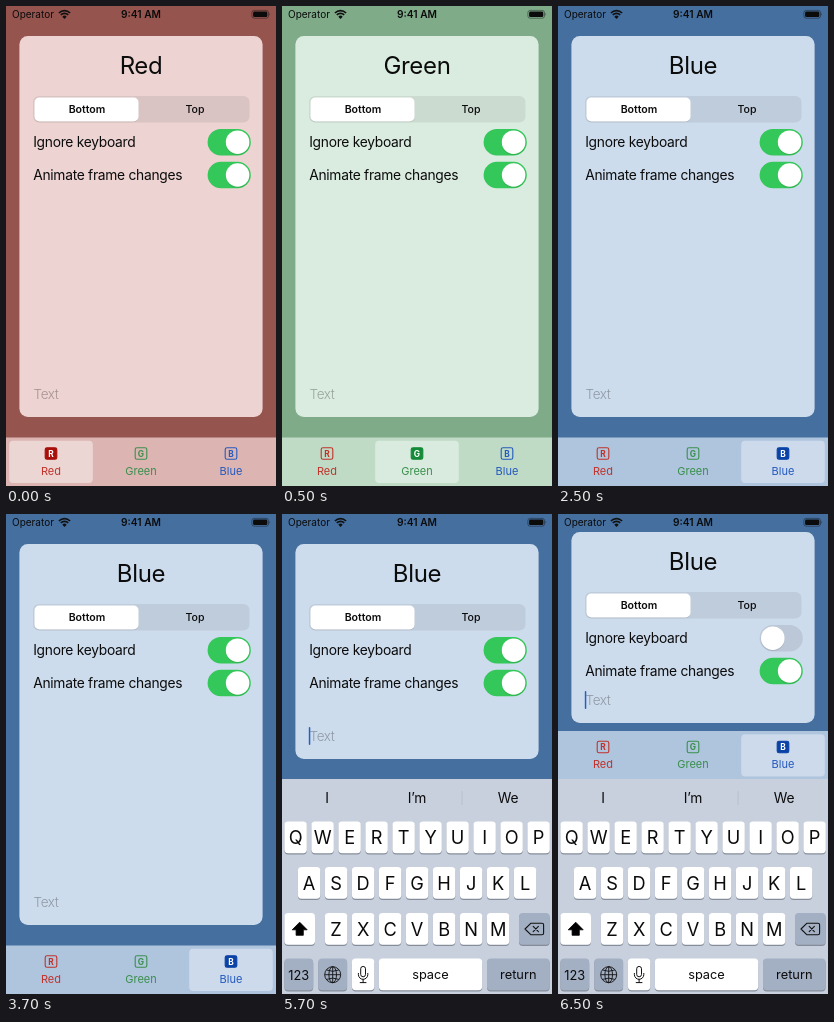
Recreate the animation shown at these times as an HTML page. Size 270 by 480 pixels, loop 8 s.

```html
<!DOCTYPE html>
<html lang="en">
<head>
<meta charset="utf-8">
<title>Tab colours</title>
<style>
  html, body { margin: 0; width: 100%; height: 100%; overflow: hidden; }
  svg { display: block; width: 100%; height: 100%; }
  text { font-family: Inter, Roboto, sans-serif; fill: #0b0b0c; }
  .mid { text-anchor: middle; }
  .title { font-size: 24px; letter-spacing: -.35px; }
  .row { font-size: 13.8px; letter-spacing: -.28px; }
  .seg { font-size: 10.6px; font-weight: 500; }
  .bold { font-weight: 600; }
  .hint { font-size: 13.5px; font-weight: 300; letter-spacing: -.4px; fill: #000; opacity: .3; }
  .tab { font-size: 11px; }
  .badge { font-size: 8.4px; font-weight: 700; }
  .key { font-size: 18.2px; }
  .word { font-size: 12.8px; }
</style>
</head>
<body>
<svg id="stage" viewBox="0 0 270 480" preserveAspectRatio="none"></svg>
<script>
const themes = {
  Red:   { back: '#96544f', card: '#edd3d2', track: '#dac4c3', bar: '#dcb5b3', lit: '#ecd6d4' },
  Green: { back: '#7fab89', card: '#daece0', track: '#cbdbd0', bar: '#bfdbc6', lit: '#d9ebdf' },
  Blue:  { back: '#456f9f', card: '#cddcec', track: '#bfccdb', bar: '#afc4dd', lit: '#ccdaec' }
};
const tabs = [
  { name: 'Red',   x: 45,  ink: '#c0322a', full: '#a80f0a' },
  { name: 'Green', x: 135, ink: '#3a8f4c', full: '#158a38' },
  { name: 'Blue',  x: 225, ink: '#2459bd', full: '#0a42a6' }
];
const scenes = [
  { at: 0,    theme: 'Red',   top: 30, bottom: 411, tabY: 431.5, ignore: true },
  { at: 500,  theme: 'Green', top: 30, bottom: 411, tabY: 431.5, ignore: true },
  { at: 2500, theme: 'Blue',  top: 30, bottom: 411, tabY: 431.5, ignore: true },
  { at: 4500, theme: 'Blue',  top: 30, bottom: 245, tabY: null,  ignore: true,  typing: true },
  { at: 6500, theme: 'Blue',  top: 18, bottom: 209, tabY: 217,   ignore: false, typing: true }
];
const LOOP = 8000;

const rect = (x, y, w, h, r, fill, more = '') =>
  `<rect x="${x}" y="${y}" width="${w}" height="${h}" rx="${r}" fill="${fill}" ${more}/>`;
const text = (x, y, cls, s, more = '') => `<text x="${x}" y="${y}" class="${cls}" ${more}>${s}</text>`;
const path = (d, more) => `<path d="${d}" ${more}/>`;
const line = (d, w, color = '#111') =>
  path(d, `fill="none" stroke="${color}" stroke-width="${w}" stroke-linecap="round" stroke-linejoin="round"`);
const move = (y, s) => `<g transform="translate(0 ${y})">${s}</g>`;

function statusBar() {
  const arc = r => {
    const d = r * .707;
    return path(`M${58.5 - d} ${12.6 - d}A${r} ${r} 0 0 1 ${58.5 + d} ${12.6 - d}`,
      'fill="none" stroke="#111" stroke-width="1.7"');
  };
  return text(6, 12.2, '', 'Operator', 'font-size="10"') +
    arc(7.9) + arc(5.2) + path('M58.5 13L56.3 10.7A3.1 3.1 0 0 1 60.7 10.7Z', 'fill="#111"') +
    text(135, 12.2, 'mid bold', '9:41 AM', 'font-size="10.2"') +
    rect(245.9, 4.4, 16.6, 7.8, 2.2, 'none', 'stroke="#111" stroke-opacity=".55" stroke-width=".8"') +
    rect(247.1, 5.6, 14.2, 5.4, 1.3, '#0b0b0c') +
    path('M263.5 6.8Q264.9 8.3 263.5 9.8Z', 'fill="#111" opacity=".6"');
}

function toggle(y, on, off) {
  return rect(201.6, y - 13.2, 43.2, 26.4, 13.2, on ? '#34c759' : off) +
    `<circle cx="${on ? 231.6 : 214.8}" cy="${y + .8}" r="12" fill="#000" opacity=".1"/>` +
    `<circle cx="${on ? 231.6 : 214.8}" cy="${y}" r="11.8" fill="#fff"/>`;
}

function card(s, t) {
  const mid = s.bottom - 23;
  const head = text(135, 68, 'mid title', s.theme) +
    rect(27, 90, 216.5, 26.5, 6.2, t.track) +
    rect(28.4, 92.2, 104.2, 24, 5, '#000', 'opacity=".12"') +
    rect(28.4, 91.6, 104.2, 23.8, 5, '#fff') +
    text(81, 107.2, 'mid seg bold', 'Bottom') +
    text(189, 107.2, 'mid seg', 'Top') +
    text(27.2, 141, 'row', 'Ignore keyboard') + toggle(136.2, s.ignore, '#bcc8d7') +
    text(27.2, 174, 'row', 'Animate frame changes') + toggle(169, true);
  return rect(13.4, s.top, 243.2, s.bottom - s.top, 8.5, t.card) +
    move(s.top - 30, head) +
    text(27.6, mid + 5, 'hint', 'Text') +
    (s.typing ? rect(26.8, mid - 9, 1.5, 18, .7, '#2360c4') : '');
}

function tabBar(s, t) {
  const items = tabs.map(b => {
    const on = b.name === s.theme, color = on ? b.full : b.ink;
    return (on ? rect(b.x - 41.8, 3.2, 83.6, 42.3, 4, t.lit) : '') +
      rect(b.x - 5.8, 10.2, 11.6, 11.6, 1.8, on ? color : 'none', `stroke="${color}" stroke-width="1.1"`) +
      text(b.x, 19.1, 'mid badge', b.name[0], `style="fill:${on ? '#fff' : color}"`) +
      text(b.x, 37.4, 'mid tab', b.name, `style="fill:${b.ink}"`);
  });
  return move(s.tabY, rect(0, 0, 270, 48.5, 0, t.bar) + items.join(''));
}

function keyboard() {
  const key = (x, y, w, fill = '#fff') =>
    rect(x, y + 1, w, 32, 3.7, '#858d9a') + rect(x, y, w, 31.8, 3.7, fill);
  const gray = '#a3afc3';
  const rows = [['QWERTYUIOP', 2.4, 307.5], ['ASDFGHJKL', 15.9, 353], ['ZXCVBNM', 42.9, 399]];
  let out = rect(0, 265, 270, 215, 0, '#c8d0de');
  [['I', 45], ['I’m', 135], ['We', 226]].forEach(([s, x]) => { out += text(x, 289, 'mid row', s); });
  out += rect(179.7, 277, .7, 14, 0, '#b2bac9');
  for (const [letters, x, y] of rows)
    [...letters].forEach((c, i) => {
      const kx = x + i * 27;
      out += key(kx, y, 22.4) + text(kx + 11.2, y + 22.6, 'mid key', c);
    });

  out += key(2.4, 399, 30.6) +
    path('M17.7 408.2L25.2 415.8H21.3V421.3H14.1V415.8H10.2Z',
      'fill="#000" stroke="#000" stroke-width=".8" stroke-linejoin="round"');
  out += key(237, 399, 30.6, gray) +
    line('M249 409.2H260Q261.6 409.2 261.6 410.8V419.2Q261.6 420.8 260 420.8H249L243 415Z', 1.1) +
    line('M251.2 412.4L256.4 417.6M256.4 412.4L251.2 417.6', 1.1);

  out += key(2.4, 444.5, 28.8, gray) + text(16.8, 465.5, 'mid word', '123');
  out += key(36.3, 444.5, 28.8, gray) +
    '<g fill="none" stroke="#111" stroke-width=".9"><circle cx="50.7" cy="460.7" r="8"/>' +
    '<ellipse cx="50.7" cy="460.7" rx="3.8" ry="8"/>' +
    '<path d="M50.7 452.7V468.7M42.7 460.7H58.7M44.6 456Q50.7 458.6 56.8 456M44.6 465.4Q50.7 462.8 56.8 465.4"/></g>';
  out += key(69.9, 444.5, 22.4) +
    rect(78.7, 452.4, 4.8, 10.4, 2.4, 'none', 'stroke="#111" stroke-width="1"') +
    line('M76.4 459.4V460.6A4.7 4.7 0 0 0 85.8 460.6V459.4M81.1 465.4V468.6M78.2 468.6H84', 1);
  out += key(96.9, 444.5, 103.3) + text(148.5, 464.6, 'mid word', 'space');
  out += key(205, 444.5, 62.6, gray) + text(236.3, 464.6, 'mid word', 'return');
  return out;
}

const draw = s => {
  const t = themes[s.theme];
  return '<g visibility="hidden">' + rect(0, 0, 270, 480, 0, t.back) + statusBar() + card(s, t) +
    (s.tabY === null ? '' : tabBar(s, t)) + (s.typing ? keyboard() : '') + '</g>';
};

const stage = document.getElementById('stage');
stage.innerHTML = scenes.map(draw).join('');
const layers = [...stage.children];

function tick() {
  const now = performance.now() % LOOP;
  const current = scenes.filter(s => s.at <= now).length - 1;
  layers.forEach((g, i) => g.setAttribute('visibility', i === current ? 'visible' : 'hidden'));
  requestAnimationFrame(tick);
}
tick();
</script>
</body>
</html>
```
